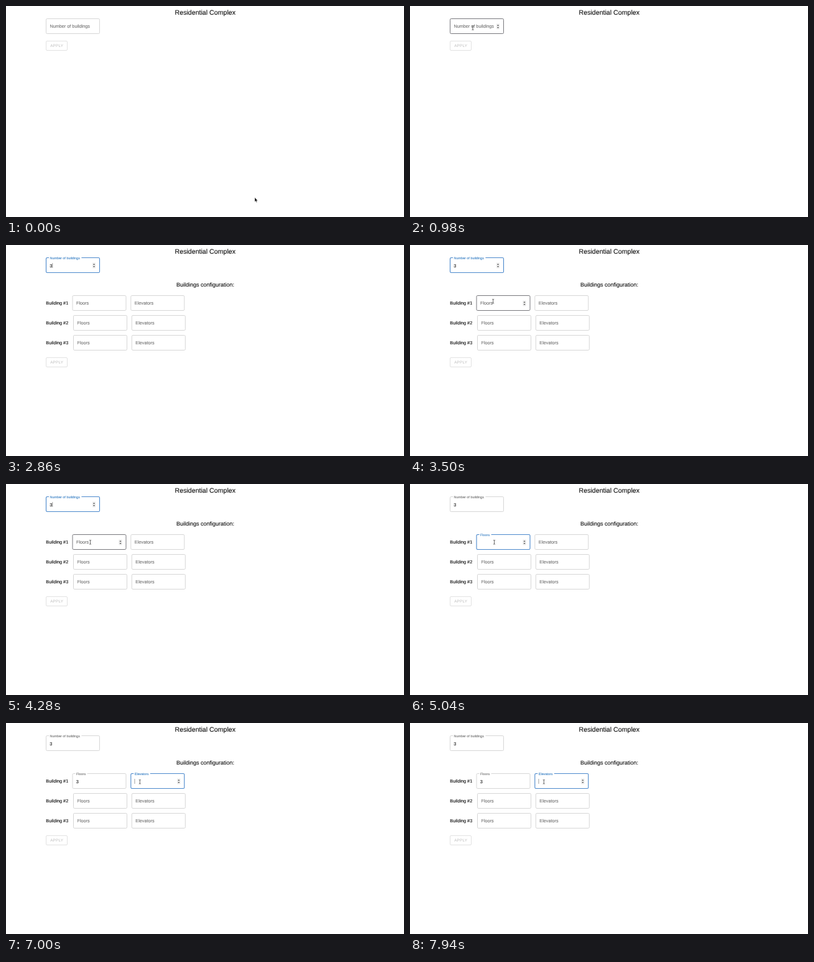
Write an HTML page that moves like this. It is 640x340 px and loops after 8000 ms.

```html
<!DOCTYPE html>
<html lang="en">
<head>
<meta charset="utf-8">
<title>Residential Complex</title>
<style>
  html, body { margin: 0; width: 100%; height: 100%; overflow: hidden; background: #fff; }
  svg { display: block; width: 100%; height: 100%; }
  text {
    font-family: "Liberation Sans", Arial, sans-serif;
    fill: #111;
    stroke: #111;
    stroke-width: .12px;
    text-rendering: geometricPrecision;
  }
  .value, .name { font-size: 7.25px; }
  .label { fill: #757575; stroke: #757575; }
  .focused .label { fill: #3f84c6; stroke: #3f84c6; }
  .outline { fill: none; stroke: #d6d6d6; }
  .hovered .outline { stroke: #77777c; }
  .focused .outline { stroke: #4a88cc; stroke-width: 1.1; }
  .notch { fill: #fff; }
  .caret { fill: #777; }
  .apply text { font-size: 6.34px; letter-spacing: .2px; fill: #bdbdbd; stroke: none; }
  .apply rect { fill: none; stroke: #e2e2e2; }
</style>
</head>
<body>
<svg id="stage" viewBox="0 0 640 340">
  <text x="320.3" y="13.6" font-size="10.63" text-anchor="middle">Residential Complex</text>
  <g id="config">
    <text x="320.5" y="66.5" font-size="9" text-anchor="middle">Buildings configuration:</text>
  </g>
  <g id="apply" class="apply">
    <rect x="64.5" y="56.5" width="34" height="15" rx="1.5"/>
    <text x="71.2" y="66.4">APPLY</text>
  </g>
</svg>
<script>
const LOOP = 8000;
const TYPED_COUNT = 2320, TYPED_FLOORS = 5420;
const WIDTH = 86, HEIGHT = 24;
const stage = document.getElementById("stage");
const config = document.getElementById("config");
const apply = document.getElementById("apply");

function add(parent, tag, attrs, text = "") {
  const node = document.createElementNS(stage.namespaceURI, tag);
  for (const key in attrs) node.setAttribute(key, attrs[key]);
  node.textContent = text;
  parent.append(node);
  return node;
}

const show = (node, visible) => node.setAttribute("visibility", visible ? "visible" : "hidden");
const clamp = v => Math.max(0, Math.min(1, v));
const ease = v => v * v * (3 - 2 * v);
const within = (t, [start, end]) => t >= start && t < end;

function makeField(parent, x, y, label, labelWidth, options = {}) {
  const group = add(parent, "g", { transform: `translate(${x} ${y})` });
  add(group, "rect", { class: "outline", width: WIDTH, height: HEIGHT, rx: 1.8 });
  const field = {
    x, y, group, labelWidth,
    focus: [Infinity, Infinity], typed: Infinity, carets: [],
    notch: add(group, "rect", { class: "notch", x: 4.5, y: -1.5, height: 3 }),
    label: add(group, "text", { class: "label", x: 6 }, label),
    value: add(group, "text", { class: "value", x: 5.8, y: 15 }, "3"),
    caret: add(group, "rect", { class: "caret", y: 8.5, width: .7, height: 8 }),
    spinner: add(group, "g", {}),
    ...options
  };
  add(field.spinner, "rect", { x: 74.3, y: 8, width: 5.4, height: 9, rx: 1, fill: "#ececec" });
  add(field.spinner, "path", { d: "M75.5 11.5l1.5-2 1.5 2zM75.5 13.5l1.5 2 1.5-2z", fill: "#555" });
  return field;
}

const fields = [
  makeField(stage, 64.5, 20.5, "Number of buildings", 48.4, {
    focus: [1160, 4540], typed: TYPED_COUNT,
    carets: [[1160, 2160], [2320, 3320], [3820, 4320]]
  })
];
for (let row = 0; row < 3; row++) {
  const y = 81.5 + row * 32;
  const x = row ? 108.5 : 107;
  add(config, "text", { class: "name", x: 64.3, y: y + 14.6 }, `Building #${row + 1}`);
  fields.push(
    makeField(config, x, y, "Floors", 15.1, row ? {} : {
      focus: [4540, 6600], typed: TYPED_FLOORS,
      carets: [[4540, 5040], [5420, 5920], [6420, 6600]]
    }),
    makeField(config, x + 93.8, y, "Elevators", 22.5, row ? {} : {
      focus: [6600, LOOP],
      carets: [[6600, 7120], [7620, LOOP]]
    })
  );
}

const arrow = add(stage, "path", {
  d: "M0 0V7l1.6-1.4 1.1 2.4 1.1-.5-1.1-2.3h2.1z",
  fill: "#0c0c0c", stroke: "#fff", "stroke-width": .4
});
const beam = add(stage, "path", {
  d: "M-1.5-3.4Q0-3.4 0-2.5 0-3.4 1.5-3.4M0-2.7V2.7M-1.5 3.4Q0 3.4 0 2.5 0 3.4 1.5 3.4",
  fill: "none", stroke: "#444", "stroke-width": .8
});

// Pointer stops: time, x, y
const stops = [
  [0, 400, 308.5], [260, 400, 308.5], [460, 186, 140], [620, 186, 140],
  [980, 101, 35.3], [3140, 101, 35.3], [3560, 135.5, 93.8], [5900, 135.5, 93.8],
  [6200, 213, 95.3], [6300, 213, 95.3], [6500, 215.3, 94.8], [LOOP, 215.3, 94.8]
];
// The pointer hides while typing, until it moves again
const hidden = [[TYPED_COUNT, 3140], [TYPED_FLOORS, 5900]];

function pointerAt(t) {
  const next = stops.findIndex(stop => stop[0] > t);
  const [t0, x0, y0] = stops[next - 1];
  const [t1, x1, y1] = stops[next];
  const k = ease((t - t0) / (t1 - t0));
  return [x0 + (x1 - x0) * k, y0 + (y1 - y0) * k];
}

// Returns whether the pointer is over the field
function drawField(field, t, [px, py], ready) {
  const focused = within(t, field.focus);
  const over = ready && px >= field.x && px <= field.x + WIDTH
    && py >= field.y && py <= field.y + HEIGHT;
  const filled = t >= field.typed;
  const lift = ease(clamp((t - field.focus[0]) / 200));

  field.group.setAttribute("class", focused ? "focused" : over ? "hovered" : "");
  field.label.setAttribute("y", 14.8 - 12.8 * lift);
  field.label.setAttribute("font-size", 7.25 - 1.81 * lift);
  field.notch.setAttribute("width", (field.labelWidth + 4) * lift);
  field.caret.setAttribute("x", filled ? 10 : 5.8);
  show(field.value, ready && filled);
  show(field.caret, ready && field.carets.some(span => within(t, span)));
  show(field.spinner, ready && (focused || over));
  return over;
}

function draw(now) {
  const t = now % LOOP;
  const configured = t >= TYPED_COUNT;
  const pointer = pointerAt(t);
  let overField = false;
  for (const field of fields) {
    const ready = configured || field === fields[0];
    overField = drawField(field, t, pointer, ready) || overField;
  }
  show(config, configured);
  apply.setAttribute("transform", `translate(0 ${configured ? 125 : 0})`);

  const pointerVisible = !hidden.some(span => within(t, span));
  for (const cursor of [arrow, beam]) {
    cursor.setAttribute("transform", `translate(${pointer})`);
    show(cursor, pointerVisible && (cursor === beam) === overField);
  }
  requestAnimationFrame(draw);
}

draw(0);
</script>
</body>
</html>
```
